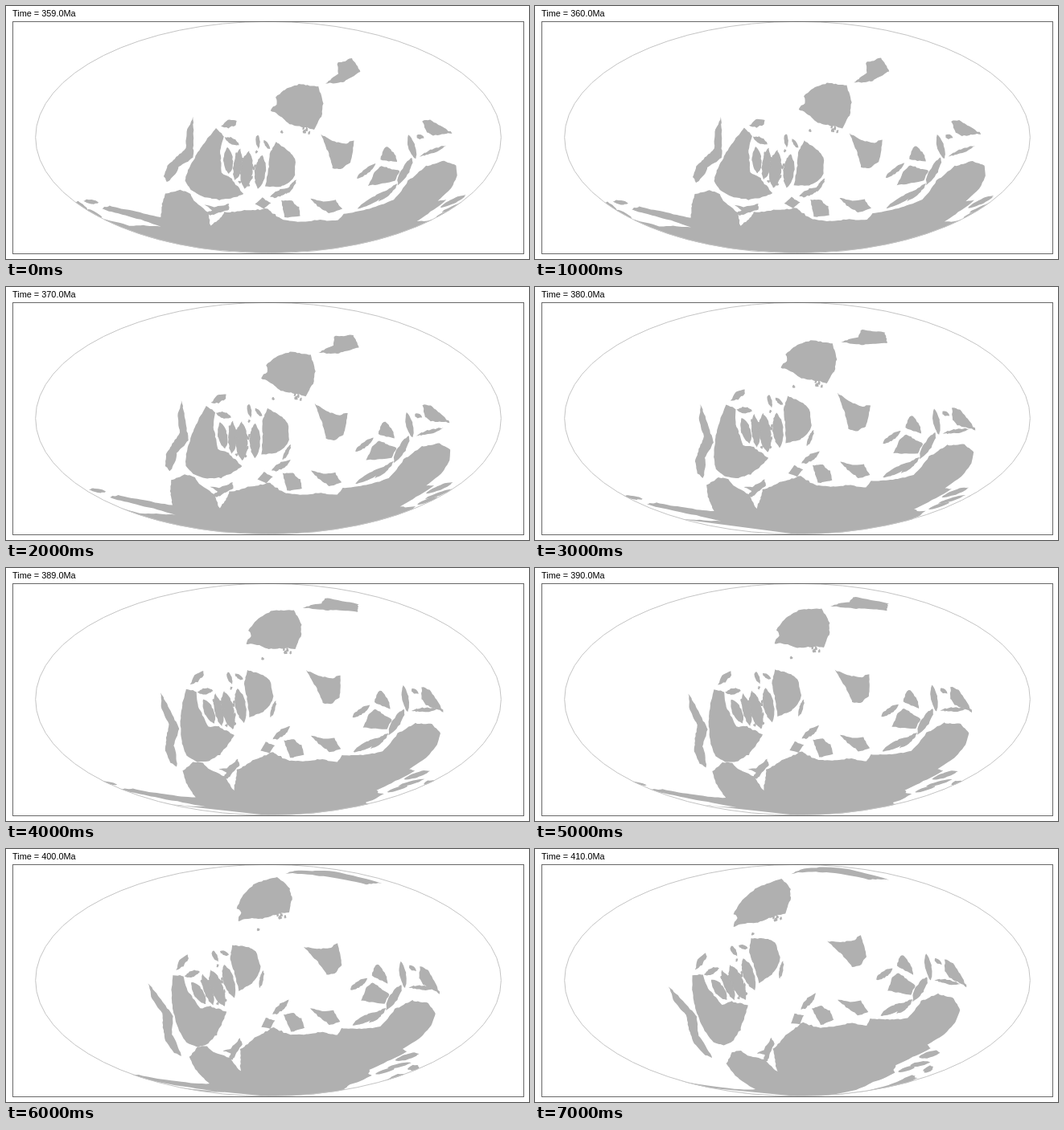
An HTML page for the animation above (8 s loop, 650 by 315 pixels).

```html
<!DOCTYPE html>
<html lang="en">
<head>
<meta charset="utf-8">
<style>
html, body { margin: 0; width: 100%; height: 100%; overflow: hidden; background: #fff; }
svg { display: block; }
text { font: 10.9px "Liberation Sans", Arial, sans-serif; }
</style>
</head>
<body>
<svg width="650" height="315" viewBox="0 0 650 315">
  <clipPath id="globe"><ellipse cx="326" cy="163.5" rx="289.5" ry="144.5"/></clipPath>
  <g id="land" fill="#b0b0b0" clip-path="url(#globe)"></g>
  <ellipse cx="326" cy="163.5" rx="289.3" ry="144.2" fill="none" stroke="#c4c4c4"/>
  <rect x="8.5" y="19.5" width="635" height="289" fill="none" stroke="#686868"/>
  <text id="label" x="8" y="13"></text>
</svg>
<script>
// Rigid plates turn on a sphere, which is shown in a Mollweide projection.
const { PI, sin, cos, asin, atan2, hypot, random: _, ceil, round, abs, min, max } = Math;
const CX = 326, CY = 163.5, RX = 289.5, RY = 144.5;
const ages = [359, 360, 370, 380, 389, 390, 400, 410];   // one per second
const keyAges = [359, 380, 400, 410];
const BASE = 1;                                          // outlines are drawn at 380 Ma

let seed = 7;
const rand = () => (seed = seed * 16807 % 2147483647) / 2147483647;
const points = s => s.split(' ').map(p => p.split(',').map(Number));

// Pointed island between two ends
function lens(x1, y1, x2, y2, width) {
  const length = hypot(x2 - x1, y2 - y1), side = [];
  for (let i = 0; i < 12; i++) {
    const t = i < 6 ? i / 6 : 2 - i / 6;
    const w = (i < 6 ? 1 : -1) * width / 2 * sin(PI * t) ** 0.6 / length;
    side.push([x1 + (x2 - x1) * t - (y2 - y1) * w, y1 + (y2 - y1) * t + (x2 - x1) * w]);
  }
  return side;
}

// Small islands strewn over a box
const scatter = (x, y, w, h, count) => Array.from({ length: count }, () => {
  const px = x + w * rand(), py = y + h * rand();
  return lens(px, py, px + 4 * rand() - 2, py + 3 + 3 * rand(), 3);
});

// poses: two places on the plate at each key age
const plates = [
  {
    poses: ['329,129 439,82', '305,100 437,70', '288,90 447,44', '246,97 414,38'],
    shapes: [
      points('305,100 313,92 312,84 326,72 343,67 370,71 375,90 373,102 363,120 341,115 331,114 318,105'),
      points('381,69 390,65 401,62 406,53 420,55 434,56 437,63 437,70 420,71 408,72 394,71'),
      ...scatter(322, 115, 38, 8, 6)
    ]
  },
  {
    poses: ['392,160 432,167', '376,132 417,147', '370,122 412,117', '363,115 405,107'],
    shapes: [points('376,132 390,142 405,149 417,147 411,174 399,180 390,177 385,157')]
  },
  {
    poses: ['333,170 201,219', '313,136 208,238', '281,119 217,259', '268,111 220,261'],
    shapes: [
      points('238,146 250,152 249,168 259,197 272,199 290,213 268,233 250,238 235,235 225,227 222,212 227,175'),
      points('243,142 249,131 261,127 261,133 252,140'),
      points('206,146 204,166 210,186 199,217 202,232 209,238 212,224 211,212 222,194 216,173'),
      points('314,136 333,144 341,152 344,172 339,183 329,190 312,194 311,172 309,152'),
      lens(283, 157, 289, 206, 15), lens(272, 158, 276, 200, 10), lens(257, 163, 267, 195, 12),
      lens(300, 156, 304, 200, 13), lens(251, 153, 270, 154, 8), lens(346, 178, 338, 198, 5),
      lens(290, 134, 294, 150, 5), lens(299, 138, 308, 147, 5),
      ...scatter(251, 150, 46, 52, 14)
    ]
  },
  {
    poses: ['517,143 555,158', '518,150 548,178', '512,143 541,183', '509,137 537,172'],
    shapes: [points('518,150 528,153 548,178 525,172 519,165')]
  },
  {
    poses: ['228,236 559,200', '240,239 545,204', '250,248 533,206', '256,252 528,200'],
    shapes: [
      points('176,288 205,290 230,291 200,284 165,277 138,270 150,268 190,275 222,279 217,268 213,247 ' +
        '228,237 240,239 247,247 266,258 275,276 280,264 283,252 306,242 330,235 350,247 392,246 411,250 ' +
        '418,241 442,240 470,234 490,211 512,197 534,196 545,205 542,220 530,236 510,250 517,252 ' +
        '494,265 470,277 485,279 476,286'),
      points('257,248 270,249 285,239 287,247 275,256 270,262 263,259 270,254'),
      points('315,232 322,222 333,227 326,236'),
      points('345,222 357,221 367,229 369,241 352,244'),
      points('379,217 392,221 409,221 416,234 402,238 388,227'),
      points('460,175 464,163 469,160 478,172 480,183'),
      points('445,207 453,190 461,183 482,195 476,207'),
      lens(331, 220, 354, 205, 8), lens(432, 237, 471, 217, 8), lens(455, 232, 478, 212, 6),
      lens(478, 214, 498, 181, 10), lens(496, 152, 502, 184, 8), lens(432, 195, 455, 179, 7),
      lens(507, 182, 540, 177, 5), lens(506, 155, 515, 160, 6), lens(110, 260, 134, 264, 4),
      lens(505, 262, 540, 249, 6), lens(500, 270, 535, 259, 4), lens(488, 277, 515, 268, 4)
    ]
  }
];

const dot = (a, b) => a[0] * b[0] + a[1] * b[1] + a[2] * b[2];
const cross = (a, b) => [0, 1, 2].map(i => a[(i + 1) % 3] * b[(i + 2) % 3] - a[(i + 2) % 3] * b[(i + 1) % 3]);
const unit = a => a.map(v => v / hypot(...a));
const mix = (a, b, t) => unit(a.map((v, i) => v + (b[i] - v) * t));

function toSphere([x, y]) {
  const t = asin(max(-1, min(1, (CY - y) / RY)));
  const lat = asin((2 * t + sin(2 * t)) / PI);
  const lon = (x - CX) / RX * PI / cos(t);
  return [cos(lat) * cos(lon), cos(lat) * sin(lon), sin(lat)];
}

// Parametric latitude t with 2t + sin 2t = PI sin(lat)
function mollweide(lat) {
  let low = -PI / 2, high = PI / 2;
  for (let i = 0; i < 30; i++) {
    const t = (low + high) / 2;
    if (2 * t + sin(2 * t) < PI * sin(lat)) low = t; else high = t;
  }
  return (low + high) / 2;
}

// Cut edges into short steps and roughen the coast
function coast(outline) {
  const corners = outline.map(toSphere);
  return corners.flatMap((a, i) => {
    const b = corners[(i + 1) % corners.length];
    const steps = ceil(hypot(...a.map((v, k) => v - b[k])) / 0.03);
    return Array.from({ length: steps }, (_, k) =>
      unit(mix(a, b, k / steps).map(v => v + (rand() - 0.5) * 0.012)));
  });
}

// Axes fixed to a plate by two of its points
function axes([a, b]) {
  const x = unit(a.map((v, i) => v + b[i])), z = unit(cross(a, b));
  return [x, cross(z, x), z];
}

// Longitudes run on past the map edge, so copies one turn apart fill both sides
function pathOf(ring) {
  const flat = [];
  for (const [x, y, z] of [...ring, ring[0]]) {
    let lon = atan2(y, x);
    if (flat.length) lon += 2 * PI * round((flat[flat.length - 1][0] - lon) / (2 * PI));
    flat.push([lon, mollweide(asin(z))]);
  }
  const first = flat[0][0], last = flat[flat.length - 1][0];
  if (abs(last - first) > 1) flat.push([last, -PI / 2], [first, -PI / 2]);   // around the south pole
  return [-1, 0, 1].map(turn => 'M' + flat.map(([lon, t]) =>
    (CX + RX * (lon / PI + 2 * turn) * cos(t)).toFixed(1) + ',' + (CY - RY * sin(t)).toFixed(1)
  ).join('L') + 'Z').join('');
}

const land = document.getElementById('land');
const label = document.getElementById('label');
for (const plate of plates) {
  plate.poses = plate.poses.map(s => points(s).map(toSphere));
  plate.shapes = plate.shapes.map(outline => {
    const path = document.createElementNS('http://www.w3.org/2000/svg', 'path');
    land.append(path);
    return { path, ring: coast(outline) };
  });
}

function show(age) {
  let k = 0;
  while (k < keyAges.length - 2 && age >= keyAges[k + 1]) k++;
  const t = (age - keyAges[k]) / (keyAges[k + 1] - keyAges[k]);
  for (const { poses, shapes } of plates) {
    const from = axes(poses[BASE]);
    const to = axes(poses[k].map((p, i) => mix(p, poses[k + 1][i], t)));
    const turn = p => [0, 1, 2].map(i => from.reduce((sum, axis, j) => sum + dot(axis, p) * to[j][i], 0));
    for (const { path, ring } of shapes) path.setAttribute('d', pathOf(ring.map(turn)));
  }
  label.textContent = `Time = ${age.toFixed(1)}Ma`;
}

let shown;
function tick() {
  const age = ages[Math.floor(performance.now() / 1000) % ages.length];
  if (age !== shown) show(shown = age);
  requestAnimationFrame(tick);
}
tick();
</script>
</body>
</html>
```
